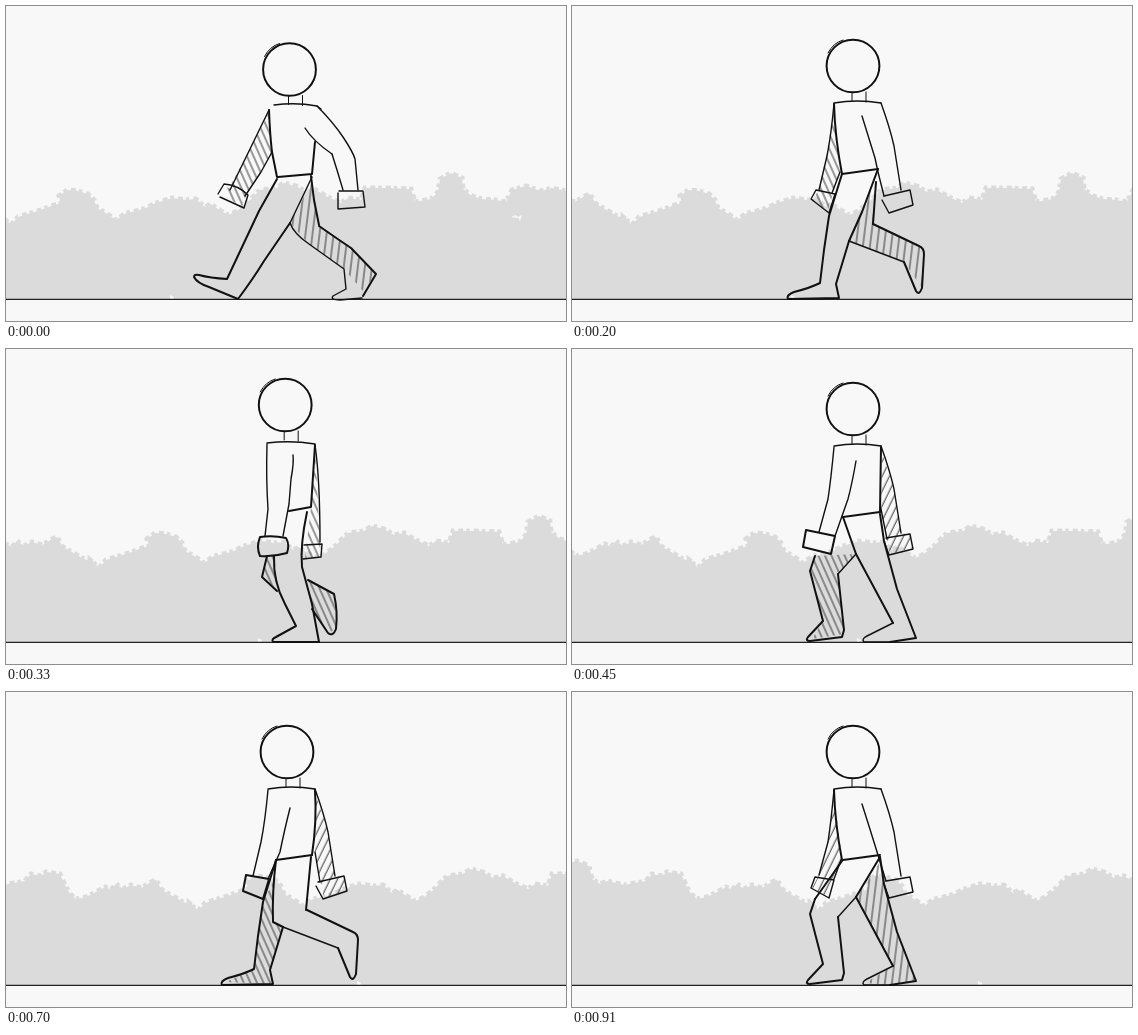
Animation of 560x315 px, one loop 950 ms. Source, as an HTML page without scripts:

```html
<!DOCTYPE html>
<html lang="en">
<head>
<meta charset="utf-8">
<title>Walk cycle</title>
<style>
html, body { margin: 0; width: 100%; height: 100%; overflow: hidden; background: #f8f8f8; }
svg { display: block; width: 560px; height: 315px; overflow: hidden; }
.ink { fill: none; stroke: #111; stroke-width: 1.4; stroke-linecap: round; stroke-linejoin: round; }
.bold { stroke-width: 2; }
.thin { stroke-width: 1; }
.back, .fore, .steep { stroke: none; }
.back { fill: url(#back); }
.fore { fill: url(#fore); }
.steep { fill: url(#steep); }
.leaves path { fill: #dbdbdb; stroke: #dbdbdb; stroke-width: 5; stroke-dasharray: 3.5 4 5 3; }
.speck { fill: #f8f8f8; }
.scroll { animation: scroll .95s infinite; }
.poses { animation: poses .95s step-end infinite; }

/* 24 fps on a 10 ms clock: every sixth drawing holds 50 ms, the rest 40 ms */
@keyframes scroll {
  0%       { transform: translateX(0); animation-timing-function: steps(5); }
  21.0526% { transform: translateX(55px); animation-timing-function: step-end; }
  26.3158% { transform: translateX(66px); animation-timing-function: steps(5); }
  47.3684% { transform: translateX(121px); animation-timing-function: step-end; }
  52.6316% { transform: translateX(132px); animation-timing-function: steps(5); }
  73.6842% { transform: translateX(187px); animation-timing-function: step-end; }
  78.9474% { transform: translateX(198px); animation-timing-function: steps(5); }
  100%     { transform: translateX(253px); }
}
@keyframes poses {
  0%       { transform: translateX(0); }
  12.6316% { transform: translateX(-560px); }
  26.3158% { transform: translateX(-1120px); }
  38.9474% { transform: translateX(-1680px); }
  52.6316% { transform: translateX(-2240px); }
  65.2632% { transform: translateX(-2800px); }
  78.9474% { transform: translateX(-3360px); }
  91.5789%, 100% { transform: translateX(-3920px); }
}
</style>
</head>
<body>
<svg viewBox="0 0 560 315">
<defs>
  <pattern id="back" width="6" height="40" patternUnits="userSpaceOnUse" patternTransform="rotate(-24)"><path d="M3 0V40" stroke="#222" stroke-width=".9"/></pattern>
  <pattern id="fore" width="6.5" height="40" patternUnits="userSpaceOnUse" patternTransform="rotate(26)"><path d="M3 0V40" stroke="#222" stroke-width=".9"/></pattern>
  <pattern id="steep" width="7" height="40" patternUnits="userSpaceOnUse" patternTransform="rotate(7)"><path d="M3 0V40" stroke="#222" stroke-width=".9"/></pattern>

  <g id="head">
    <ellipse class="bold" cx="281" cy="60" rx="26.4" ry="26.3"/>
    <path class="thin" d="M256 47Q261 37 271 34M280 87V95M294 86V96"/>
  </g>

  <!-- outlines shared by both halves of the walk -->
  <g id="contact">
    <use href="#head" x="2.5" y="3.5"/>
    <path d="M268 99Q290 96 311 100L315 103"/>
    <path class="bold" d="M266 146L271 171M272 171L306 168M309 136L306 168"/>
    <path d="M311 100Q327 116 337 131T349 153L352 184M326 148L331 164 337 184"/>
    <path d="M333 185H357L359 201 332 203V187"/>
    <path d="M266 146L255 166 239 190M212 188L218 178Q232 179 242 189L238 202 214 191"/>
    <path class="bold" d="M271 173L253 205 221 273M221 273Q204 272 193 269 188 268 188 271 191 277 203 281L232 293Q247 273 258 255L284 217"/>
    <path class="bold" d="M305 170L308 194 313 219M313 220Q333 234 345 242L370 268 357 290"/>
    <path d="M284 217Q288 228 303 238L338 263 340 283 327 290Q324 294 334 294L356 292"/>
  </g>
  <g id="down">
    <use href="#head"/>
    <path d="M262 97Q285 93 309 97"/>
    <path class="bold" d="M270 168L306 163"/>
    <path d="M309 97Q318 122 322 140L329 184M312 190L338 184 341 199 317 207 310 194"/>
    <path d="M262 98Q259 130 255 150L247 184"/>
    <path class="bold" d="M270 168L257 210 252 244 248 277M248 277Q238 282 222 286 214 289 216 293L267 292 264 278 277 235"/>
    <path class="bold" d="M301 218L347 240Q352 242 352 248L350 282Q347 290 344 285L332 256"/>
    <path d="M277 235L332 256"/>
  </g>
  <g id="up">
    <use href="#head" x="-1.8" y="-4"/>
    <path d="M261 94Q285 91 309 95"/>
    <path class="bold" d="M254 188Q267 186 280 189 284 195 281 204 267 208 254 207 250 198 254 188Z"/>
    <path d="M309 96Q314 130 314 193M298 196L316 195 315 208 297 210"/>
    <path class="bold" d="M268 207Q267 233 279 255L290 277 270 288Q265 290 267 293L313 293 306 255"/>
    <path class="bold" d="M261 207L256 228 271 242M302 231L328 245Q332 263 330 280 327 288 322 284L306 260"/>
  </g>
  <g id="reach">
    <use href="#head"/>
    <path d="M262 97Q285 93 309 97"/>
    <path class="bold" d="M271 168L308 163"/>
    <path d="M309 97Q318 122 322 140L329 184M314 189L338 185 341 200 317 206 312 192"/>
    <path d="M262 98Q259 130 256 150L247 183"/>
    <path class="bold" d="M243 207L238 222 245 249 251 272 236 288Q233 292 238 292L270 288 272 281 266 225"/>
    <path d="M266 225L284 205"/>
    <path class="bold" d="M284 205L321 274M308 165L312 192 325 240 344 289 318 293"/>
    <path d="M321 274L295 287Q289 290 292 293L318 293"/>
  </g>
</defs>

<g class="scroll">
  <g class="leaves">
    <path d="M-250 300V172L-237 169-225 174-222 187-214 192-207 189-190 193-168 189-162 182-152 184-147 180-133 182-128 193-123 202-117 207-107 205-97 200-88 195-82 198-77 192-70 197-62 193-52 196-42 190-37 188-31 198-22 203-10 210 0 213V300Z"/>
    <path d="M-4 300V211L5 219 12 211 25 207 35 204 45 200 55 197 53 190 61 184 72 185 82 188 88 194 91 202 100 207 110 214 120 207 130 205 140 202 150 197 160 194 166 192 180 194 190 193 199 201 205 198 212 203 222 209 232 205V300Z"/>
    <path d="M228 300V207L239 199 246 192 254 184 270 182 278 177 290 180 300 186 310 184 320 190 335 197 342 192 355 194 359 182 380 182 405 183 409 196 425 193 432 186 434 173 445 167 456 172 457 183 466 190 476 193 490 194 500 196 506 184 520 180 535 185 546 182 566 186V300Z"/>
  </g>
  <path class="speck" d="M164 289l4 2-1 3h-3zM505 211l5-2 2 2 4-2-2 6-2-3z"/>
</g>
<path fill="#f8f8f8" d="M0 293H560V315H0Z"/>
<path stroke="#222" stroke-width="1.2" d="M0 293.4H560"/>

<g class="poses ink">
  <g>
    <path class="back" d="M263 106L266 146 239 192 222 184 244 143ZM218 180L240 190 236 200 222 193Z"/>
    <path class="steep" d="M306 175L313 220 345 242 370 268 357 285 338 263 303 238 284 217Z"/>
    <use href="#contact"/>
    <path class="bold" d="M263 104Q264 130 266 146"/>
    <path d="M263 104L244 143 224 184M299 122Q307 135 326 148M306 171L284 217"/>
  </g>
  <g transform="translate(560)">
    <path class="back" d="M262 106L269 162 261 187 256 205 240 194 247 184 254 150Z"/>
    <path class="steep" d="M302 175L301 218 352 243 350 282 332 256 277 235Z"/>
    <use href="#down"/>
    <path class="bold" d="M262 98Q263 132 270 168M306 163L290 206 277 235M304 176L301 218"/>
    <path d="M290 110L303 152 306 166 312 190M268 166L260 187M239 193L244 184 263 188 257 207Z"/>
  </g>
  <g transform="translate(1120)">
    <path class="back" d="M309 100L314 193 315 208 299 209 306 150ZM261 207H268L273 242 256 228ZM302 231L328 245 330 280 322 284 306 260Z"/>
    <use href="#up"/>
    <path class="bold" d="M309 96L305 158 283 162M301 163Q294 196 296 218L306 255"/>
    <path d="M261 95Q260 130 262 160L259 187M287 106Q288 114 285 130L283 155 277 187"/>
  </g>
  <g transform="translate(1680)">
    <path class="fore" d="M310 104L322 140 329 184 339 186 340 199 318 205 309 160Z"/>
    <path class="back" d="M243 207L284 205 266 225 272 285 240 290 251 272 238 222Z"/>
    <use href="#reach"/>
    <path class="bold" d="M309 98L308 163M271 168L284 205M234 181L263 187 259 205 231 198Z"/>
    <path d="M284 112Q280 135 276 150L263 187M309 160L315 190"/>
  </g>
  <g transform="translate(2240)">
    <path class="fore" d="M312 103L337 131 349 153 352 184 357 186 358 200 334 201 337 184 326 148 311 134Z"/>
    <path class="steep" d="M270 176L284 217 258 255 232 292 192 273 221 273 253 205Z"/>
    <use href="#contact"/>
    <path class="bold" d="M312 102L309 136"/>
    <path d="M268 99Q253 120 244 143L222 184M274 129L266 146M309 133L326 148M271 172L277 192 284 217"/>
  </g>
  <g transform="translate(2800)">
    <path class="fore" d="M310 104L322 140 329 184 339 186 340 199 318 206 309 162Z"/>
    <path class="back" d="M267 190L267 230 277 235 264 278 267 292 220 290 248 277 257 210Z"/>
    <use href="#down"/>
    <path class="bold" d="M309 98Q311 130 306 163M270 168Q266 200 267 230L277 235M305 165L300 218M240 183L263 187 257 207 237 199Z"/>
    <path d="M284 116Q278 140 274 160L262 187M309 160L314 190"/>
  </g>
  <g transform="translate(3360)">
    <path class="back" d="M261 104L268 160 275 188 259 187ZM272 240L306 262 313 292 270 291 290 277Z"/>
    <use href="#up"/>
    <path class="bold" d="M261 95L268 162 304 158M268 163L261 207M271 242L306 260M304 160L302 231"/>
    <path d="M261 98Q260 130 262 160L259 187M290 106Q293 130 295 150L299 195"/>
  </g>
  <g transform="translate(3920)">
    <path class="fore" d="M262 104L270 166 261 187 256 205 240 196 247 183 256 150Z"/>
    <path class="steep" d="M308 170L325 240 344 289 318 293 293 291 321 274 284 205Z"/>
    <use href="#reach"/>
    <path class="bold" d="M262 98Q263 132 270 168M270 169L243 207M308 165L284 205"/>
    <path d="M290 112Q298 137 306 163L314 189M269 168L262 187M239 196L243 185 262 188 257 206Z"/>
  </g>
</g>
</svg>
</body>
</html>
```
